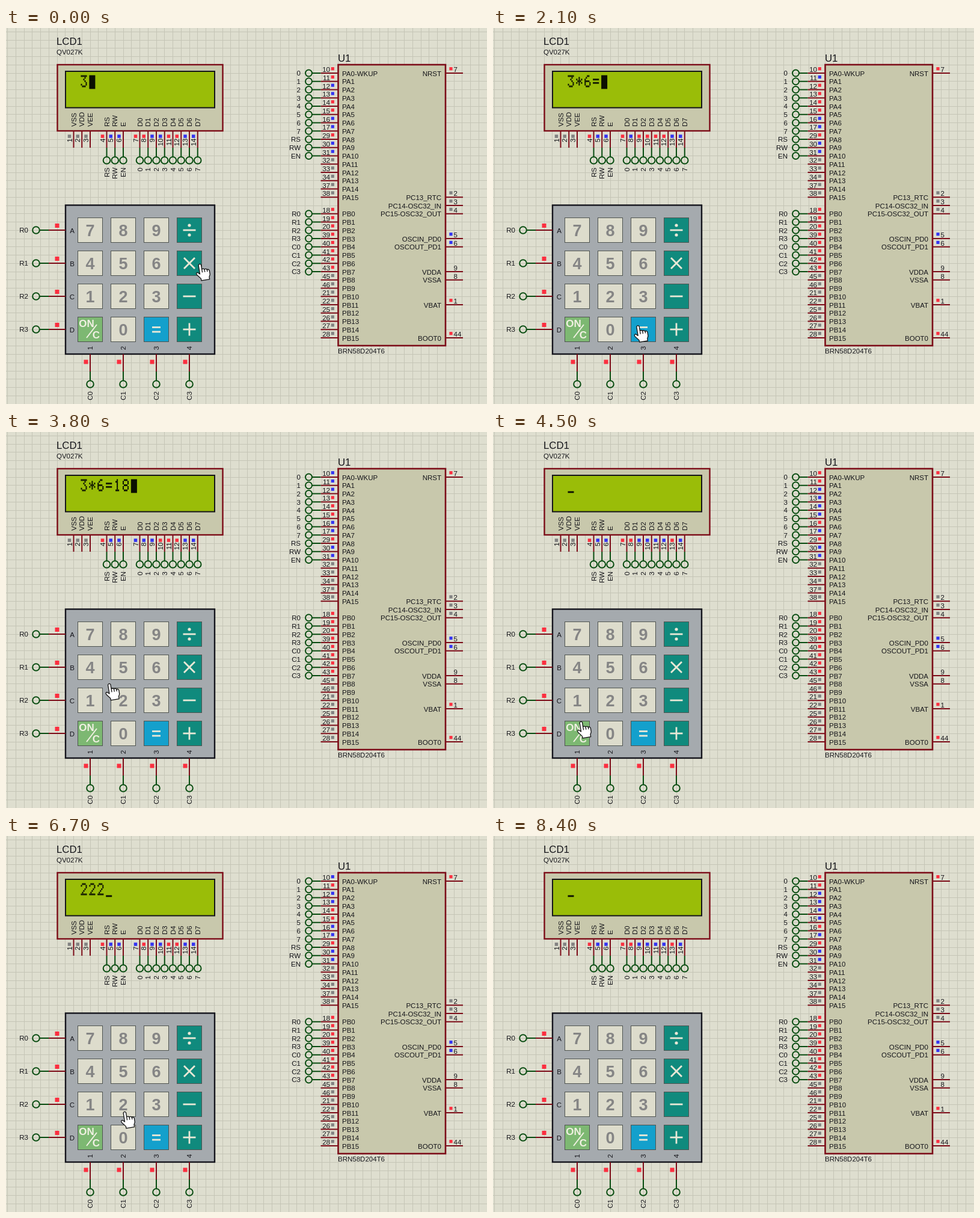
Animation, 800 px wide and 625 px high, one loop 8.5 s. Source, as an HTML page with a canvas:

```html
<!DOCTYPE html>
<html lang="en">
<head>
<meta charset="utf-8">
<title>Calculator circuit</title>
<style>
html, body { margin: 0; width: 100%; height: 100%; overflow: hidden; background: #dedecf; }
canvas { display: block; width: 800px; height: 625px; }
</style>
</head>
<body>
<canvas id="stage" width="800" height="625"></canvas>
<script>
const ctx = document.getElementById('stage').getContext('2d');
const LOOP = 8500, STEP = 100, PITCH = 13.75;
const FONT = '"Liberation Sans", Arial, sans-serif';
const MAROON = '#7c0c18', GREEN = '#084c10', INK = '#15151a';
const HIGH = '#fb2f40', LOW = '#3434f2', IDLE = '#828282';
const BODY = '#c8c8ac', CREAM = '#dddccc';

// time, text on the display, last byte sent
const WRITES = [
  [0, '3', '3'], [300, '3*', '*'], [1300, '3*6', '6'], [1900, '3*6=', '='],
  [2600, '3*6=1', '1'], [3200, '3*6=18', '8'], [4400, '', 'C'], [5300, '2', '2'],
  [5800, '22', '2'], [6300, '222', '2'], [7400, '', 'C']
];

// time, x and y of the fingertip
const PATH = [
  [0, 322, 392], [300, 317, 393], [1000, 257, 385], [1300, 257, 385],
  [1800, 252, 500], [2000, 252, 500], [2500, 143, 446], [2650, 143, 446],
  [3000, 208, 329], [3300, 207, 330], [4200, 146, 481], [4600, 146, 481],
  [5200, 192, 437], [6400, 192, 439], [6700, 197, 458], [7200, 146, 484],
  [7450, 146, 484], [8100, 330, -40]
];

// five-bit rows, top to bottom
const GLYPHS = {
  '1': [4, 12, 4, 4, 4, 4, 14],
  '2': [14, 17, 1, 2, 4, 8, 31],
  '3': [31, 2, 4, 2, 1, 17, 14],
  '6': [6, 8, 16, 30, 17, 17, 14],
  '8': [14, 17, 17, 14, 17, 17, 14],
  '*': [0, 4, 21, 14, 21, 4, 0],
  '=': [0, 0, 31, 0, 31, 0, 0]
};

const LEFT_PINS = [10, 11, 12, 13, 14, 15, 16, 17, 29, 30, 31, 32, 33, 34, 37, 38,
  18, 19, 20, 39, 40, 41, 42, 43, 45, 46, 21, 22, 25, 26, 27, 28];
const LEFT_NETS = [...'01234567', 'RS', 'RW', 'EN', '', '', '', '', '',
  'R0', 'R1', 'R2', 'R3', 'C0', 'C1', 'C2', 'C3'];
const RIGHT_PINS = [
  [0, 'NRST', 7, HIGH], [15, 'PC13_RTC', 2, IDLE], [16, 'PC14-OSC32_IN', 3, IDLE],
  [17, 'PC15-OSC32_OUT', 4, IDLE], [20, 'OSCIN_PD0', 5, LOW], [21, 'OSCOUT_PD1', 6, LOW],
  [24, 'VDDA', 9], [25, 'VSSA', 8], [28, 'VBAT', 1, HIGH], [32, 'BOOT0', 44, HIGH]
];
const LCD_PINS = ['VSS', 'VDD', 'VEE', 'RS', 'RW', 'E',
  'D0', 'D1', 'D2', 'D3', 'D4', 'D5', 'D6', 'D7'];

function line(x1, y1, x2, y2, color, width = 2) {
  ctx.strokeStyle = color;
  ctx.lineWidth = width;
  ctx.beginPath();
  ctx.moveTo(x1, y1);
  ctx.lineTo(x2, y2);
  ctx.stroke();
}

function box(x, y, w, h, fill, stroke, width) {
  ctx.fillStyle = fill;
  ctx.fillRect(x, y, w, h);
  ctx.strokeStyle = stroke;
  ctx.lineWidth = width;
  ctx.strokeRect(x, y, w, h);
}

function square(x, y, size, color) {
  ctx.fillStyle = color;
  ctx.fillRect(x - size / 2, y - size / 2, size, size);
}

function ring(x, y, r = 5.8) {
  ctx.strokeStyle = GREEN;
  ctx.lineWidth = 2;
  ctx.beginPath();
  ctx.arc(x, y, r, 0, 7);
  ctx.stroke();
}

function text(str, x, y, { size = 11.5, align = 'left', color = INK, weight = '', up = false } = {}) {
  ctx.save();
  ctx.translate(x, y);
  if (up) ctx.rotate(-Math.PI / 2);
  ctx.font = `${weight} ${size}px ${FONT}`;
  ctx.textAlign = align;
  ctx.fillStyle = color;
  ctx.fillText(str, 0, 0);
  ctx.restore();
}

function drawGrid() {
  ctx.fillStyle = '#dedecf';
  ctx.fillRect(0, 0, 800, 625);
  for (let x = 2.5; x < 800; x += PITCH) line(Math.floor(x) + .5, 0, Math.floor(x) + .5, 625, '#c5c5b6', 1);
  for (let y = 6.25; y < 625; y += PITCH) line(0, Math.floor(y) + .5, 800, Math.floor(y) + .5, '#c5c5b6', 1);
}

function drawLcd(state) {
  text('LCD1', 84, 28, { size: 16.8 });
  text('QV027K', 84, 44);
  box(85.5, 61, 275, 110, BODY, MAROON, 2.4);
  box(99, 72, 248, 60.5, '#9abd08', INK, 2);

  LCD_PINS.forEach((name, i) => {
    const gap = i > 5 ? 2 : i > 2 ? 1 : 0;
    const x = 112.5 + (i + gap) * PITCH;
    line(x, 171, x, 199, MAROON);
    text(name, x + 4, 164, { up: true });
    text(i + 1, x - 3, 183.5, { up: true, align: 'right' });
    let color = IDLE;
    if (i > 5) color = state.bit(i - 6);
    else if (i > 2) color = i === 3 ? HIGH : LOW;
    square(x - 7, 180, 5.5, color);
    if (i > 2) {
      line(x, 199, x, 214, GREEN);
      ring(x, 220);
      text(i > 5 ? i - 6 : ['RS', 'RW', 'EN'][i - 3], x + 4, 232, { up: true, align: 'right' });
    }
  });

  ctx.fillStyle = '#0b1002';
  const dotW = 2, dotH = 2.85;
  const cellX = n => 124.5 + n * 13.9;
  [...state.text].forEach((ch, n) => GLYPHS[ch].forEach((row, r) => {
    for (let c = 0; c < 5; c++) {
      if (row >> (4 - c) & 1) ctx.fillRect(cellX(n) + c * dotW, 78.5 + r * dotH, dotW, dotH);
    }
  }));
  const x = cellX(state.text.length);
  if (state.block) ctx.fillRect(x, 78.5, 5 * dotW, 8 * dotH);
  else ctx.fillRect(x, 78.5 + 7 * dotH, 5 * dotW, dotH);
}

function drawChip(state) {
  text('U1', 552, 56, { size: 16.8 });
  text('BRN58D204T6', 552, 541);
  box(552.5, 61, 178.5, 467, BODY, MAROON, 2.6);

  LEFT_PINS.forEach((pin, i) => {
    const portB = i > 15, n = i % 16;
    const y = 75 + (i + (portB ? 1 : 0)) * PITCH;
    const name = (portB ? 'PB' : 'PA') + n + (i ? '' : '-WKUP');
    line(523.5, y, 552, y, MAROON);
    text(name, 559, y + 4.5);
    text(pin, 539, y - 2, { align: 'right' });
    let color = IDLE;
    if (portB) {
      if (n < 4) color = state.rows;
      else if (n < 8) color = HIGH;
    } else if (n < 8) color = state.bit(n);
    else if (n < 11) color = n === 8 ? HIGH : LOW;
    square(543.3, y - 7.3, 5.2, color);
    if (LEFT_NETS[i]) {
      line(509, y, 523.5, y, GREEN);
      ring(503.5, y, 5.5);
      text(LEFT_NETS[i], 490, y + 4.3, { align: 'right' });
    }
  });

  for (const [row, name, pin, color] of RIGHT_PINS) {
    const y = 75 + row * PITCH;
    line(731, y, 760, y, MAROON);
    text(name, 724, y + 4.5, { align: 'right' });
    text(pin, 744.5, y - 2);
    if (color) square(740, y - 7.3, 5.2, color);
  }
}

function drawKey(label, x, y) {
  const isDigit = label >= '0' && label <= '9';
  const fill = isDigit ? CREAM : label === 'ON' ? '#7db872' : label === '=' ? '#14a0cc' : '#108a7d';
  box(x - 20.5, y - 20.5, 41, 41, fill, '#4f5450', 1);
  const bar = (x1, y1, x2, y2) => line(x + x1, y + y1, x + x2, y + y2, '#e9e8d6', 2.8);
  if (isDigit) text(label, x, y + 9.5, { size: 27, align: 'center', weight: 'bold', color: '#858585' });
  else if (label === 'ON') {
    text('ON', x - 6, y - 4, { size: 17, align: 'center', color: '#f0f0e2', weight: 'bold' });
    text('C', x + 10, y + 15, { size: 17, align: 'center', color: '#f0f0e2', weight: 'bold' });
    line(x - 6, y + 14, x + 11, y - 8, '#f0f0e2', 2);
  } else if (label === '=') {
    bar(-7, -3.5, 7, -3.5);
    bar(-7, 4, 7, 4);
  } else if (label === '×') {
    bar(-9, -9, 9, 9);
    bar(-9, 9, 9, -9);
  } else {
    bar(-10.5, 0, 10.5, 0);
    if (label === '+') bar(0, -10.5, 0, 10.5);
    if (label === '÷') for (const dy of [-8, 8]) {
      ctx.fillStyle = '#e9e8d6';
      ctx.beginPath();
      ctx.arc(x, y + dy, 2.6, 0, 7);
      ctx.fill();
    }
  }
}

function drawKeypad(state) {
  box(99, 294.5, 248, 247.5, '#a5aaae', '#14141c', 2.4);
  const rows = ['789÷', '456×', '123−', 'C0=+'];
  rows.forEach((keys, i) => {
    const x = 140 + i * 55, y = 336 + i * 55;
    line(56, y, 71, y, GREEN);
    line(71, y, 99, y, MAROON);
    ring(50, y);
    square(85, y - 7.5, 7, state.rows);
    text('R' + i, 37, y + 4.3, { align: 'right' });
    text('ABCD'[i], 110, y + 4.5, { align: 'center' });

    line(x, 542, x, 571, MAROON);
    line(x, 571, x, 586, GREEN);
    ring(x, 592);
    square(x - 7, 555, 7, HIGH);
    text('C' + i, x + 4, 604, { up: true, align: 'right' });
    text(i + 1, x + 4, 532, { up: true, align: 'center' });
    [...keys].forEach((key, k) => drawKey(key === 'C' ? 'ON' : key, 140 + k * 55, y));
  });
}

function drawHand([x, y]) {
  ctx.save();
  ctx.translate(x, y);
  ctx.rotate(-.16);
  ctx.scale(1.3, 1.3);
  ctx.fillStyle = '#fff';
  ctx.strokeStyle = '#111';
  ctx.lineWidth = 1;
  ctx.lineJoin = 'round';
  const shape = new Path2D('M-1.7 1.5Q0-1 1.7 1.5V7.5Q3.5 6 5 8Q7 6.8 8.2 9Q10.4 8 11 10.5V15.5L9.5 18.5V21.5H-1.2V19L-5.6 13.5Q-7 10.5-4.2 10.6L-1.7 13Z');
  ctx.fill(shape);
  ctx.stroke(shape);
  for (const fx of [1.7, 5, 8.2]) line(fx, 8, fx, 11.5, '#111', 1);
  ctx.restore();
}

function handAt(t) {
  const next = PATH.findIndex(p => p[0] > t);
  if (next < 0) return null;
  const a = PATH[next - 1], b = PATH[next];
  const u = (t - a[0]) / (b[0] - a[0]), k = u * u * (3 - 2 * u);
  return [a[1] + (b[1] - a[1]) * k, a[2] + (b[2] - a[2]) * k];
}

function stateAt(t) {
  const [, shown, byte] = WRITES.filter(w => w[0] <= t).pop();
  const scanning = WRITES.some(w => t < w[0] && t >= w[0] - STEP);
  return {
    text: shown,
    bit: n => byte.charCodeAt(0) >> n & 1 ? HIGH : LOW,
    rows: scanning ? LOW : HIGH,
    block: (t + 200) % 1000 < 500
  };
}

function draw(t) {
  const state = stateAt(t);
  drawGrid();
  drawLcd(state);
  drawChip(state);
  drawKeypad(state);
  const hand = handAt(t);
  if (hand) drawHand(hand);
}

const start = performance.now();
function tick() {
  const t = (performance.now() - start) % LOOP;
  draw(Math.floor(t / STEP) * STEP);
  requestAnimationFrame(tick);
}
tick();
</script>
</body>
</html>
```
